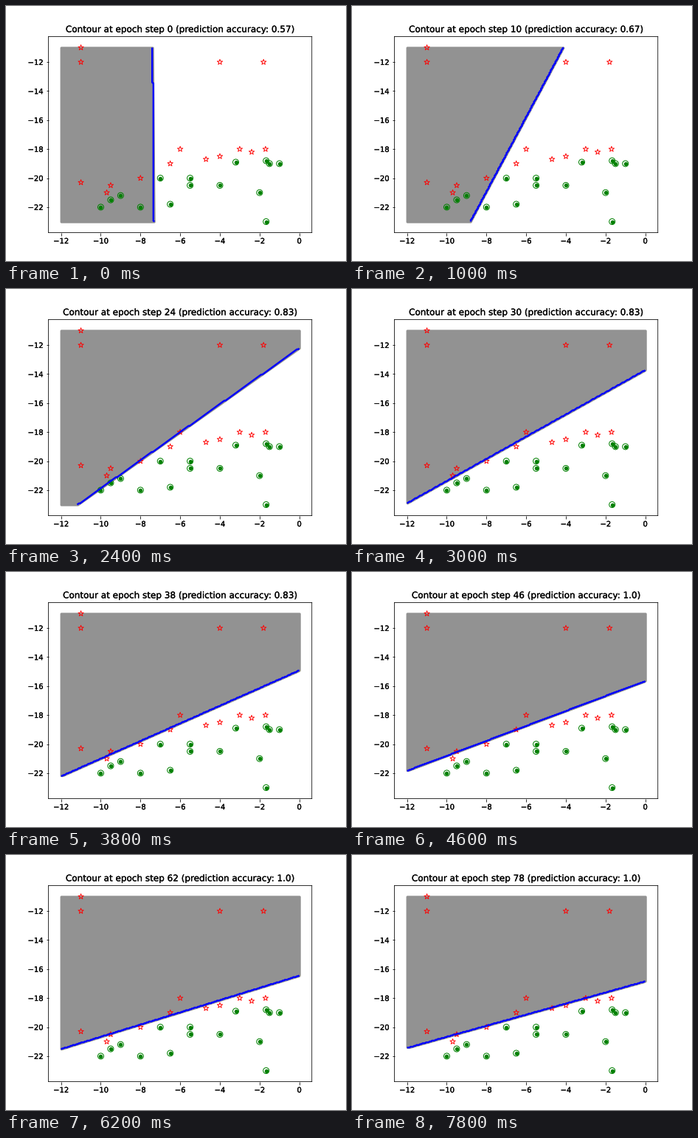
Recreate the animation shown at these times as a matplotlib script. Size 461 px wide and 346 px high, loop 8 s.

```python
import numpy as np
import matplotlib.pyplot as plt
from matplotlib import patheffects
from matplotlib.animation import FuncAnimation

W, H, DPI = 461, 346, 72
PAGE_W, PAGE_H = 460.8, 345.6
FRAMES, INTERVAL = 40, 200
LAST_STEP = 2 * (FRAMES - 1)

STARS = np.array([
    (-11, -11), (-11, -12), (-4, -12), (-1.8, -12), (-11, -20.3),
    (-9.7, -21), (-9.5, -20.5), (-8, -20), (-6.5, -19), (-6, -18),
    (-4.7, -18.7), (-4, -18.5), (-3, -18), (-2.4, -18.2), (-1.7, -18)])
DOTS = np.array([
    (-10, -22), (-9.5, -21.5), (-9, -21.2), (-8, -22), (-7, -20),
    (-6.5, -21.8), (-5.5, -20), (-5.5, -20.5), (-4, -20.5), (-3.2, -18.9),
    (-2, -21), (-1.67, -18.8), (-1.5, -19), (-1, -19), (-1.67, -23)])

xs, ys = np.linspace(-12, 0, 201), np.linspace(-23, -11, 201)
xx, yy = np.meshgrid(xs, ys)


def boundary(y, step):
    """x of the decision line at height y: it turns about a drifting pivot."""
    u = step / LAST_STEP
    tilt = -0.00632 + u * (2.652 + u * (4.208 + u * (-6.75 + u * 2.51)))
    pivot = -7.3576 + u * (5.844 + u * (9.949 + u * (-13.048 + u * 4.205)))
    return pivot + tilt * (y + 17)


def accuracy(step):
    return (0.57, 0.67, 0.83, 1.0)[sum(step >= s for s in (10, 24, 44))]


# Unsnapped lines and outlined text, as on a vector page
plt.rcParams.update({"path.snap": False, "text.hinting": "none"})
fig, ax = plt.subplots(figsize=(W / DPI, H / DPI), dpi=DPI)
fig.subplots_adjust(left=0.125 * PAGE_W / W, right=0.9 * PAGE_W / W,
                    bottom=1 - 0.89 * PAGE_H / H, top=1 - 0.12 * PAGE_H / H)
ax.set(xlim=(-12.634, 0.634), ylim=(-23.762, -10.238),
       xticks=range(-12, 1, 2), yticks=range(-22, -11, 2))
title = ax.set_title("")
outline = [patheffects.withStroke(linewidth=0.25, foreground="black")]
for text in [title, *ax.get_xticklabels(), *ax.get_yticklabels()]:
    text.set_path_effects(outline)

ax.scatter(*STARS.T, s=60, marker="*", facecolors="none", edgecolors="red",
           linewidths=0.9, zorder=1.5)
ax.scatter(*DOTS.T, s=64, facecolors="none", edgecolors="green",
           linewidths=1, zorder=1.5)
ax.scatter(*DOTS.T, s=30, color="green", linewidths=0, zorder=1.5)
drawn = []


def update(frame):
    step = 2 * frame
    while drawn:
        drawn.pop().remove()
    edge = boundary(ys, step)
    drawn.append(ax.fill_betweenx(
        ys, -12, np.clip(edge, -12, 0), where=edge >= -12, color="#929292",
        linewidth=3.2, joinstyle="round", zorder=1))
    inside = (xx < boundary(yy, step)).astype(float)
    drawn.append(ax.contour(xx, yy, inside, levels=[0.5], colors="blue",
                            linewidths=2.4, zorder=2))
    title.set_text(f"Contour at epoch step {step} "
                   f"(prediction accuracy: {accuracy(step)})")
    return [title]


anim = FuncAnimation(fig, update, frames=FRAMES, interval=INTERVAL,
                     init_func=lambda: update(0), repeat=True,
                     repeat_delay=0, blit=False)
plt.show()
```
